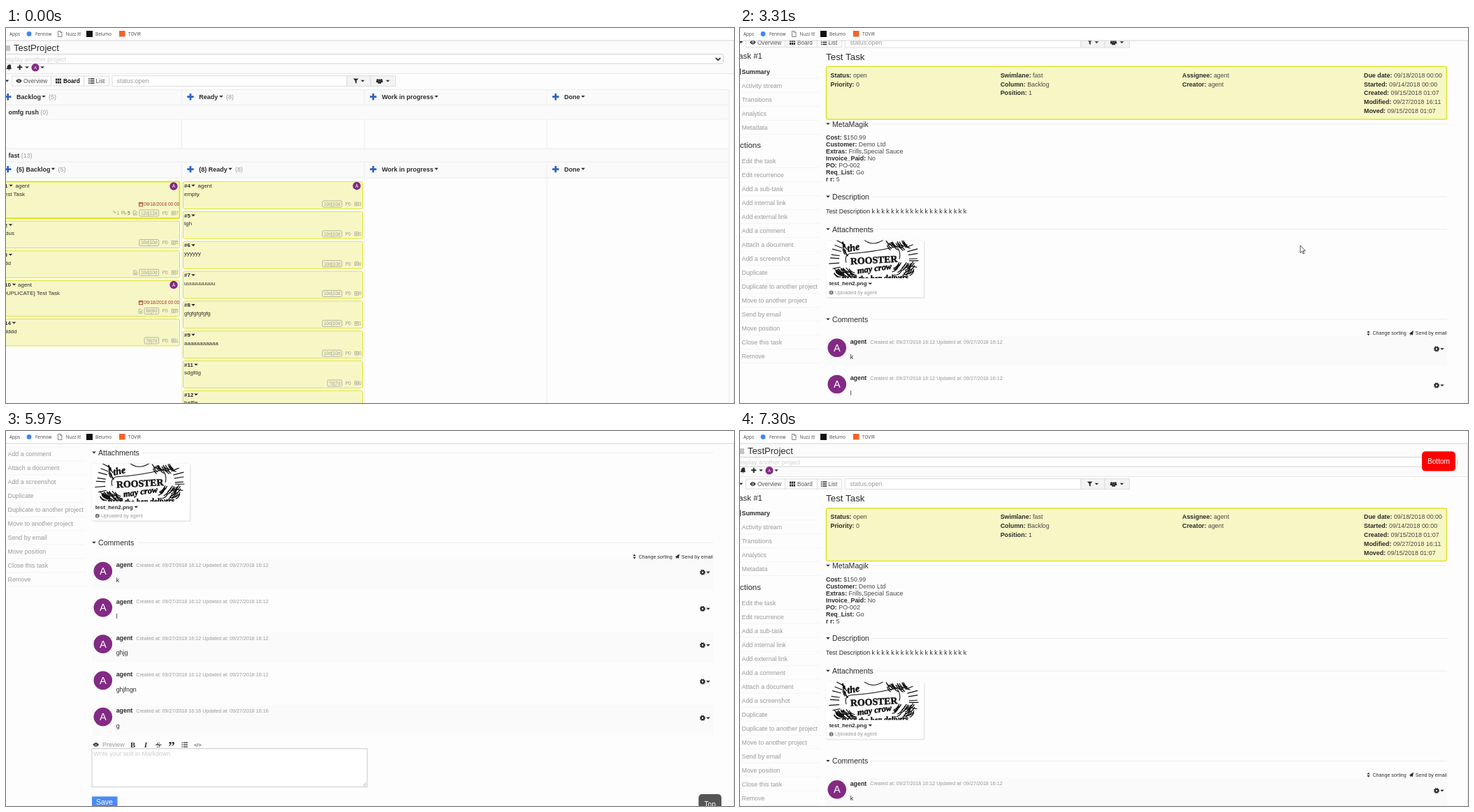
An HTML page that plays this animation: 1042x538 px, repeating every 7520 ms.

```html
<!DOCTYPE html>
<html lang="en">
<head>
<meta charset="utf-8">
<title>TestProject</title>
<style>
html, body { margin: 0; width: 100%; height: 100%; overflow: hidden; background: #fdfdfd; }
svg { display: block; width: 100vw; height: 100vh; font-family: "Liberation Sans", Arial, sans-serif; }
</style>
</head>
<body>
<svg id="stage" viewBox="0 0 1042 538"></svg>
<script>
const LOOP = 7520, PURPLE = '#832a84', BODY = 8.88;
const CARD = '#f6f7c4', EDGE = '#dfe32d', DARK = '#2b2b2b', GREY = '#999';

// Drawing helpers: each returns SVG markup
const text = (x, y, s, size = BODY, fill = DARK, more = '') =>
  `<text x="${x}" y="${y}" font-size="${size}" fill="${fill}" ${more}>${s}</text>`;
const BOLD = ' font-weight="700" ', END = ' text-anchor="end" ', MID = ' text-anchor="middle" ';
const ITALIC = ' font-style="italic" ', SERIF = ' font-family="Liberation Serif, serif" ';
const rect = (x, y, w, h, fill, more = '') =>
  `<rect x="${x}" y="${y}" width="${w}" height="${h}" fill="${fill}" ${more}/>`;
const path = (d, stroke = DARK, width = 1, fill = 'none', more = '') =>
  `<path d="${d}" stroke="${stroke}" stroke-width="${width}" fill="${fill}" ${more}/>`;
const solid = (d, fill = DARK) => path(d, 'none', 0, fill);
const circle = (x, y, r, fill, more = '') => `<circle cx="${x}" cy="${y}" r="${r}" fill="${fill}" ${more}/>`;
const hline = (x1, x2, y, c = '#ececec') => path(`M${x1} ${y}H${x2}`, c);
const caret = (x, y) => solid(`M${x - 2.8} ${y - 1.3}h5.6l-2.8 2.9z`);
const avatar = (x, y, r) => circle(x, y, r, PURPLE) + text(x, y + r * .38, 'A', r * 1.1, '#fff', MID);
const pair = (x, y, key, val) =>
  text(x, y, `<tspan ${BOLD} fill="${DARK}">${key}:</tspan> ${val}`, BODY, '#484848');
const repeat = (n, fn) => Array.from({ length: n }, (_, i) => fn(i)).join('');

// Icons
const plus = (x, y, r, w, c) => path(`M${x - r} ${y}h${2 * r}M${x} ${y - r}v${2 * r}`, c, w);
const eye = (x, y) => solid(`M${x - 4.3} ${y}q4.3-6 8.6 0q-4.3 6-8.6 0`) + circle(x, y, 1.7, '#fff') + circle(x, y, 1, DARK);
const list = (x, y) => path(`M${x + 2.5} ${y - 3}h6m-6 3h6m-6 3h6`, DARK, 1.4) +
  path(`M${x} ${y - 3}h1.6m-1.6 3h1.6m-1.6 3h1.6`, DARK, 1.4);
const grid = (x, y) => path(`M${x} ${y - 2}h8M${x} ${y + 2}h8`, DARK, 3, 'none', 'stroke-dasharray="2.3 .6"');
const gear = (x, y) => circle(x, y, 2.2, 'none', `stroke="${DARK}" stroke-width="2"`) +
  circle(x, y, 3.4, 'none', `stroke="${DARK}" stroke-width="1.3" stroke-dasharray="1.4 1.27"`);
const person = (x, y, s) => circle(x, y - 1.6 * s, 1.5 * s, DARK) + solid(`M${x - 2.4 * s} ${y + 3 * s}q0-3.4 ${2.4 * s}-3.4t${2.4 * s} 3.4z`);
const sheet = (x, y) => path(`M${x - 2.2} ${y - 3}h3l1.6 1.6v4.4h-4.6zm1.2 3h2.2m-2.2 1.5h2.2`, GREY, .7);
const info = (x, y) => circle(x, y, 3, '#777') + text(x, y + 2, 'i', 5.5, '#fff', MID + BOLD);

function browserBar() {
  const label = (x, s) => text(x, 10.7, s, 6.4, '#444', 'font-family="Open Sans, sans-serif"');
  return rect(0, 0, 1042, 18, '#fff') + hline(0, 1042, 18, '#d4d4d4') +
    label(5, 'Apps') + circle(33, 8.5, 3.4, '#4285f4') + label(42, 'Fennow') +
    path('M74.5 4.5h3.5l2 2v6h-5.5zM78 4.5v2h2', '#666', .8) + label(85.5, 'Nuzz It!') +
    rect(115, 4, 9, 9, '#111') + label(128, 'Belumo') +
    rect(162, 4, 8.5, 8.5, '#f0642a') + label(175, 'TOVIR');
}

function header() {
  return rect(0, 18, 1042, 47.5, '#fbfbfb') + hline(0, 1042, 65.5, '#e8e8e8') +
    rect(0, 25, 6, 8, '#c4c4c4') + text(11, 33.3, 'TestProject', 13.1) +
    rect(-6, 37.5, 1032.5, 13.5, '#fff', 'stroke="#d2d2d2" rx="2"') +
    text(86, 47.5, 'Display another project', BODY, '#d2d2d2', END) +
    path('M1015.8 42.8l3.4 3.4 3.4-3.4', '#333', 1.8) +
    solid('M.2 59q1.4-1 1.4-3.4t2.8-3.2t2.8 3.2t1.4 3.4zM3.2 59.6h2.4q-1.2 2-2.4 0') +
    plus(19.7, 56.3, 3.6, 2) + caret(30, 56.5) + avatar(42, 56.7, 5.6) + caret(52, 56.5);
}

function toolbar(onBoard) {
  const d = onBoard ? 0 : 2.2, box = 'stroke="#dedede"';
  return caret(1.5, 75.8) + rect(8.5, 69, 56, 14, '#fdfdfd', box) + rect(64.5, 69, 47 - d / 2, 14, '#fdfdfd', box) +
    rect(111.5 - d / 2, 69, 36 - d / 2, 14, '#fdfdfd', box) +
    eye(18.4, 76) + text(25, 79, 'Overview', 8.2, '#555') +
    grid(71, 76) + text(82, 79, 'Board', 8.2, onBoard ? '#111' : '#555', onBoard ? BOLD : '') +
    list(118 - d, 76) + text(128.5 - d, 79, 'List', 8.3, '#555') +
    rect(152 - d * .8, 68.5, 336 + d * .8, 15, '#fff', box) + text(158.5 - d / 2, 79, 'status:open', 8.9, GREY) +
    rect(488, 68.5, 34, 15, '#f3f3f3', box) + rect(522, 68.5, 35.5, 15, '#f3f3f3', box) +
    solid('M497 72.5h7.5l-2.8 3.2v4l-1.9-1.4v-2.6z') + caret(510.5, 76) +
    person(531.7, 75.5, .8) + person(537.5, 75.5, .8) + person(534.6, 76.5, 1.05) + caret(546.5, 76);
}

// Board
function columnHeads(y, counted) {
  const head = (x, s, cx, n) => plus(x, y, 4.7, 2.7, '#2f62c4') + text(x + 12.3, y + 2.9, s, 9, DARK, BOLD) +
    caret(cx, y - .5) + (n ? text(cx + 7, y + 2.9, n, 9, GREY) : '');
  return head(2.7, (counted ? '(5) ' : '') + 'Backlog', counted ? 67.5 : 54, '(5)') +
    head(264, (counted ? '(8) ' : '') + 'Ready', counted ? 321 : 308, '(8)') +
    head(525.6, 'Work in progress', 616, '') + head(786.7, 'Done', 826, '');
}

function cardFoot(right, y, days, count) {
  const w = 6 + 7.3 * days.length, x = right - 30 - w;
  return rect(x, y - 4.5, w, 9, 'none', `stroke="${GREY}" stroke-width=".7" rx="1.5"`) +
    text(x + w / 2, y + 2.4, `${days}|${days}`, 6.6, GREY, MID) + text(right - 25, y + 2.4, 'P0', 6.6, GREY) +
    rect(right - 11.5, y - 2.5, 5, 5, 'none', `stroke="${GREY}" stroke-width=".7"`) +
    plus(right - 9, y, 1.5, .7, GREY) + text(right - 5.6, y + 2.4, count, 6.6, GREY);
}

function card(x, y, w, h, border) {
  return rect(x, y + .5, w, h, CARD, `stroke="${EDGE}" stroke-width="${border}" rx="2"`);
}

function owned(x, y, right) {
  return text(x, y + 9.3, 'agent', 8) + avatar(right - 9, y + 7, 5.7);
}

function dueDate(y) {
  return rect(190.5, y - 2.5, 5.2, 5.2, 'none', 'stroke="#a43a35" stroke-width=".9"') + hline(190, 196, y - 1, '#a43a35') +
    text(197.3, y + 2.4, '09/18/2018 00:00', 6.55, '#a43a35');
}

function board() {
  const backlog = [
    [220, 53, '#1', 2.5, 'Test Task', 27, '12d', 7], [276.5, 39, '#2', 2, 'adus', 12, '10d', 5],
    [319.2, 39, '#3', 2, 'ddd', 7, '10d', 2], [362, 51.5, '#10', 7, '[DUPLICATE] Test Task', 77, '8d', 5],
    [417, 39, '#14', 7, 'ddddd', 15.5, '7d', 1]];
  const ready = [['#4', 'empty', 3], ['#5', 'tgh', 0], ['#6', 'yyyyyy', 0], ['#7', 'u'.repeat(10), 0],
    ['#8', 'gfgfgfgfgfg', 1], ['#9', 'a'.repeat(11), 0], ['#11', 'sdgfdg', 0], ['#12', 'baffle', 0]];
  return toolbar(true) + rect(0, 88.5, 1035, 42.5, '#fafafa') + rect(0, 173, 1035, 42, '#fafafa') +
    [88.5, 110.5, 131, 173, 192, 215].map(y => hline(0, 1035, y)).join('') +
    [251.5, 513, 774].map(x => path(`M${x} 88.5V110.5M${x} 131V173M${x} 192V538`, '#ececec')).join('') +
    path('M1035 88V538', '#ececec') +
    columnHeads(98.7, false) + columnHeads(202.6, true) +
    text(3.5, 123.5, `<tspan ${BOLD}>omfg rush</tspan> <tspan fill="${GREY}">(0)</tspan>`, 8.9) +
    text(3.5, 185.5, `<tspan ${BOLD}>fast</tspan> <tspan fill="${GREY}">(13)</tspan>`, 8.9) +
    backlog.map(([y, h, id, idEnd, title, end, days, n], i) =>
      card(-5, y, 253.5, h - .5, i ? 1 : 2) + text(idEnd, y + 9, id, 8, DARK, BOLD + END) + caret(idEnd + 4.5, y + 6) +
      text(end, y + 20.5, title, 8, DARK, END) + cardFoot(248.7, y + h - 7.5, days, n)).join('') +
    owned(13.5, 220, 249) + owned(17, 361.5, 249) + dueDate(253) + dueDate(394) +
    path('M153 262.8l3.5 3.5m-2-4l3 3', GREY, .8) + text(158.5, 267.5, '1', 6.6, GREY) +
    path('M165.5 263h4v2.5h-3l-1 1zM169 267h2.5v-2', GREY, .8) + text(174, 267.5, '5', 6.6, '#555') +
    sheet(184.5, 265.2) + sheet(185, 351) + sheet(192.3, 406.3) +
    ready.map(([id, title, n], i) => {
      const y = 220 + 42.83 * i;
      return card(253.5, y, 257, 39, 1) + text(255, y + 8.8, id, 8, DARK, BOLD) +
        caret(id.length > 2 ? 272 : 268, y + 6) + text(255, y + 20.5, title, 8) +
        cardFoot(510.7, y + 32.5, i > 5 ? '7d' : '10d', n);
    }).join('') + owned(274.5, 219.5, 511);
}

// Task page
function sidebar() {
  const menu = ['Summary', 'Activity stream', 'Transitions', 'Analytics', 'Metadata'];
  const actions = ['Edit the task', 'Edit recurrence', 'Add a sub-task', 'Add internal link', 'Add external link',
    'Add a comment', 'Attach a document', 'Add a screenshot', 'Duplicate', 'Duplicate to another project',
    'Move to another project', 'Send by email', 'Move position', 'Close this task', 'Remove'];
  const items = (names, y) => names.map((s, i) => hline(0, 114, y + 6.5 + 20 * i, '#f4f4f4') +
    text(2.5, y + 20 * i, s, 8.9, s === 'Summary' ? DARK : GREY, s === 'Summary' ? BOLD : '')).join('');
  return text(32, 99.5, 'Task #1', 11.5, DARK, END) + rect(0, 113.5, 1, 9, '#333') + items(menu, 121.2) +
    text(30, 227.8, 'Actions', 11.5, DARK, END) + items(actions, 249.6);
}

function section(y, name) {
  return caret(126, y - .3) + text(132, y + 3.8, name, 10.6) + hline(name === 'Attachments' ? 194 : 189, 1012, y, '#ebebeb');
}

function summary() {
  const cols = [[129.5, 'Status:open', 'Priority:0'], [372.7, 'Swimlane:fast', 'Column:Backlog', 'Position:1'],
    [633, 'Assignee:agent', 'Creator:agent'], [893, 'Due date:09/18/2018 00:00', 'Started:09/14/2018 00:00',
      'Created:09/15/2018 01:07', 'Modified:09/27/2018 16:11', 'Moved:09/15/2018 01:07']];
  const split = s => [s.slice(0, s.indexOf(':')), s.slice(s.indexOf(':') + 1)];
  const meta = ['Cost:$150.99', 'Customer:Demo Ltd', 'Extras:Frills,Special Sauce', 'Invoice_Paid:No', 'PO:PO-002',
    'Req_List:Go', 'r r:5'];
  return text(123, 101, 'Test Task', 13.4) +
    rect(123.5, 110.7, 888, 75.8, CARD, `stroke="${EDGE}" stroke-width="1.6" rx="3"`) +
    cols.map(([x, ...lines]) => lines.map((s, i) => pair(x, 126.3 + 12.8 * i, ...split(s))).join('')).join('') +
    section(193.3, 'MetaMagik') + meta.map((s, i) => pair(123, 215.6 + 10.03 * i, ...split(s))).join('') +
    section(297.6, 'Description') + text(123, 321.4, 'Test Description' + ' k'.repeat(20)) + section(344.3, 'Attachments');
}

// Hand-lettered black and white poster
function poster() {
  let seed = 7;
  const rnd = () => (seed = seed * 16807 % 2147483647) / 2147483647;
  const burst = (cx, cy, r1, r2, from, to, n, w) => path(repeat(n, i => {
    const a = from + (to - from) * (i + rnd() * .6) / n, r = r2 - rnd() * 5;
    return `M${cx + r1 * Math.cos(a)} ${cy + r1 * .8 * Math.sin(a)}L${cx + r * Math.cos(a)} ${cy + r * .8 * Math.sin(a)}`;
  }), '#111', w);
  // Slanted strokes scattered over a box
  const feathers = (x, y, w, h, dx, dy, n) => path(repeat(n, () =>
    `M${x + rnd() * w} ${y + rnd() * h}q${dx * .3} ${dy * .8} ${dx * (.6 + rnd() * .5)} ${dy}`), '#111', 1.3);
  const word = (x, y, s, size, turn, more = '') =>
    text(x, y, s, size, '#111', BOLD + MID + SERIF + more + `transform="rotate(${turn} ${x} ${y})" stroke="#111" stroke-width=".5"`);
  return `<g id="poster" clip-path="url(#thumb)">` + rect(123, 360, 140, 54.5, '#fff') +
    burst(192, 389, 50, 66, 2.9, 3.8, 7, 1.2) + burst(192, 389, 50, 66, -.5, .25, 6, 1.2) +
    path('M177 359q13 11 29 0M152 392q-3-11 6-13q34-2 66-10q7 8 4 18', '#111', 1.1) +
    feathers(204, 360, 34, 8, 8, 7, 22) + feathers(146, 362, 5, 14, 4, 8, 8) +
    feathers(134, 399, 24, 9, 9, 6, 28) + feathers(226, 390, 24, 14, -8, 7, 30) +
    word(163, 375, 'the', 14, -12, ITALIC) + word(192, 393, 'ROOSTER', 13.8, -3) +
    word(193, 404.5, 'may crow', 12.5, -8, ITALIC) + word(193, 418, 'BUT the hen delivers', 11, -2, ITALIC) + '</g>';
}

function comment(y, body, time, shaded) {
  const when = `09/27/2018 ${time}`;
  return (shaded ? rect(123, y - 8, 889, 43, '#fafafa') : '') + avatar(138.8, y + 8.6, 13.3) +
    text(157.7, y + 3, 'agent', 8.85, DARK, BOLD) +
    text(186.3, y + 2.7, `Created at: ${when} Updated at: ${when}`, 7.15, GREY) +
    text(157.7, y + 24.4, body) + gear(997, y + 10.3) + caret(1005, y + 10.3);
}

function lowerPart() {
  const bodies = ['k', 'l', 'ghjg', 'ghjfngn', 'g'];
  return text(127.7, 377, 'test_hen2.png', 7.95, DARK, BOLD) + caret(186.3, 374.3) + info(130.7, 387) +
    text(136, 389.5, 'Uploaded by agent', 7.1, GREY) + section(425.6, 'Comments') +
    solid('M897.3 444.7l2.2-2.6 2.2 2.6zM897.3 446.2l2.2 2.6 2.2-2.6z') + text(905.5, 448, 'Change sorting', 7.1) +
    solid('M957.5 446l6.5-4.3-1.2 6.6-2.2-1.2-1.3 1.9v-2.6z') + text(966.8, 448, 'Send by email', 7.1) +
    bodies.map((s, i) => comment(457.8 + 52.25 * i, s, i < 4 ? '16:12' : '16:16', i % 2 === 0)).join('') +
    eye(128.7, 715.4) + text(138, 718.5, 'Preview', BODY, GREY) +
    text(181.5, 719, 'B', 10.5, DARK, BOLD + MID + SERIF) + text(200, 719, 'I', 10.5, DARK, BOLD + MID + SERIF + ITALIC) +
    text(218.3, 719, 'S', 10, DARK, MID + SERIF) + hline(214, 222.5, 715.5, DARK) +
    text(237, 724, '”', 19, DARK, BOLD + MID + SERIF) + list(251.5, 715.4) + text(274.3, 718.3, '&lt;/&gt;', 7.5, DARK, MID) +
    rect(123, 721, 394, 55, '#fff', 'stroke="#c8c8c8"') + text(125.3, 731.5, 'Write your text in Markdown', BODY, '#ccc') +
    path('M511 774.5l4.5-4.5m-2 4.5l2-2', '#888', .7) +
    rect(123, 789.7, 36.5, 16, '#4a8bf5') + text(141, 801.4, 'Save', 10.5, '#fff', MID);
}

function taskPage() {
  return toolbar(false) + sidebar() + summary() + rect(124, 361, 140.5, 34.5, '#e6e6e6', 'id="shade" rx="2"') +
    rect(123, 360, 140, 34, '#fff', 'id="frame" stroke="#ececec" stroke-width=".8" rx="2"') +
    poster() + `<g id="lower">${lowerPart()}</g>`;
}

const button = (id, x, y, w, label) => `<g id="${id}">` + rect(x, y, w, 28.3, '#f00', 'rx="5"') +
  text(x + w / 2, y + 17.6, label, 10.1, '#fff', MID) + '</g>';

const $ = id => document.getElementById(id);
$('stage').innerHTML = `<defs><clipPath id="thumb">${rect(123, 360, 140, 54.5, '#000')}</clipPath></defs>` +
  rect(0, 0, 1042, 538, '#fdfdfd') +
  `<g id="page">${header()}<g id="board">${board()}</g><g id="task">${taskPage()}</g></g>` +
  path('M1041.5 18V538', '#e4e4e4') + button('toBottom', 976, 29.3, 48, 'Bottom') + button('toTop', 991.3, 521, 32.7, 'Top') +
  browserBar() + `<g id="cursor">${circle(0, 0, 7, '#ffe000', 'id="halo" opacity=".6"')}` +
  path('M0 0V10.5l2.5-2.3 1.6 3.7 1.5-.6-1.6-3.6h3.3z', '#111', .7, '#fff', 'id="arrow"') +
  path('M-1.2 .6q1.2-1 2.4 0V5l4.4 1q1.2 .4 1.2 1.8L5.6 11 5 13.5H-.6L-3.6 9.4q-.8-1.6 .6-1.9l1.8 1.2zM2.9 5.5v2M4.7 6v1.8',
    '#222', .8, '#fff', 'id="hand"') + '</g>';

// Motion
const clamp = v => Math.min(1, Math.max(0, v));
const swing = p => .5 - Math.cos(Math.PI * clamp(p)) / 2;
const ramp = (t, from, to) => swing((t - from) / (to - from));
const show = (id, on) => $(id).setAttribute('display', on ? 'inline' : 'none');
const between = (t, a, b) => t >= a && t < b;

// Pointer moves: start, end, target x, target y
const moves = [[210, 910, 329, 255], [930, 1430, 144, 246], [2700, 3080, 802, 312], [3480, 4240, 1014, 53],
  [5130, 5660, 1007, 552], [5910, 6130, 1005, 529], [7160, 7290, 1005, 552]];

function pointer(t) {
  let x = 915, y = 505;
  for (const [a, b, tx, ty] of moves) {
    const k = ramp(t, a, b);
    x += (tx - x) * k;
    y += (ty - y) * k;
  }
  return [x, y];
}

function scrollAt(t) {
  if (t < 3310) return 0;
  if (t < 6425) return Math.min(313.2, 55.5 + 800 * ramp(t, 4540, 5140));
  return 313.2 * (1 - ramp(t, 6425, 7020));
}

function paintButton(id, opacity, hover) {
  show(id, opacity > .01);
  $(id).setAttribute('opacity', opacity);
  $(id).firstChild.setAttribute('fill', hover ? '#555' : '#f00');
}

function draw(t) {
  const loaded = t >= 2300, [x, y] = pointer(t);
  show('board', t < 2150);
  show('task', t >= 2150);
  show('poster', loaded);
  $('frame').setAttribute('height', loaded ? 82 : 34);
  $('shade').setAttribute('height', loaded ? 82.5 : 34.5);
  $('lower').setAttribute('transform', `translate(0 ${loaded ? 47.9 : 0})`);
  $('page').setAttribute('transform', `translate(0 ${-scrollAt(t)})`);

  const onBottom = x > 976 && between(y, 29, 58), onTop = x > 991 && between(y, 521, 549);
  paintButton('toBottom', t < 4584 ? ramp(t, 3310, 3710) : t < 6000 ? 1 - ramp(t, 4584, 4984) : ramp(t, 6850, 7150), onBottom);
  paintButton('toTop', t < 6000 ? ramp(t, 4584, 4984) : 1 - ramp(t, 6930, 7300), onTop);

  const hand = onBottom || onTop || (t < 1910 && x < 511) || between(t, 2150, 2700);
  show('cursor', t >= 210);
  show('hand', hand);
  show('arrow', !hand);
  show('halo', between(t, 1450, 1600) || between(t, 4410, 4560) || between(t, 6270, 6440));
  $('cursor').setAttribute('transform', `translate(${x} ${y})`);
}

function tick() {
  draw(performance.now() % LOOP);
  requestAnimationFrame(tick);
}
tick();
</script>
</body>
</html>
```
